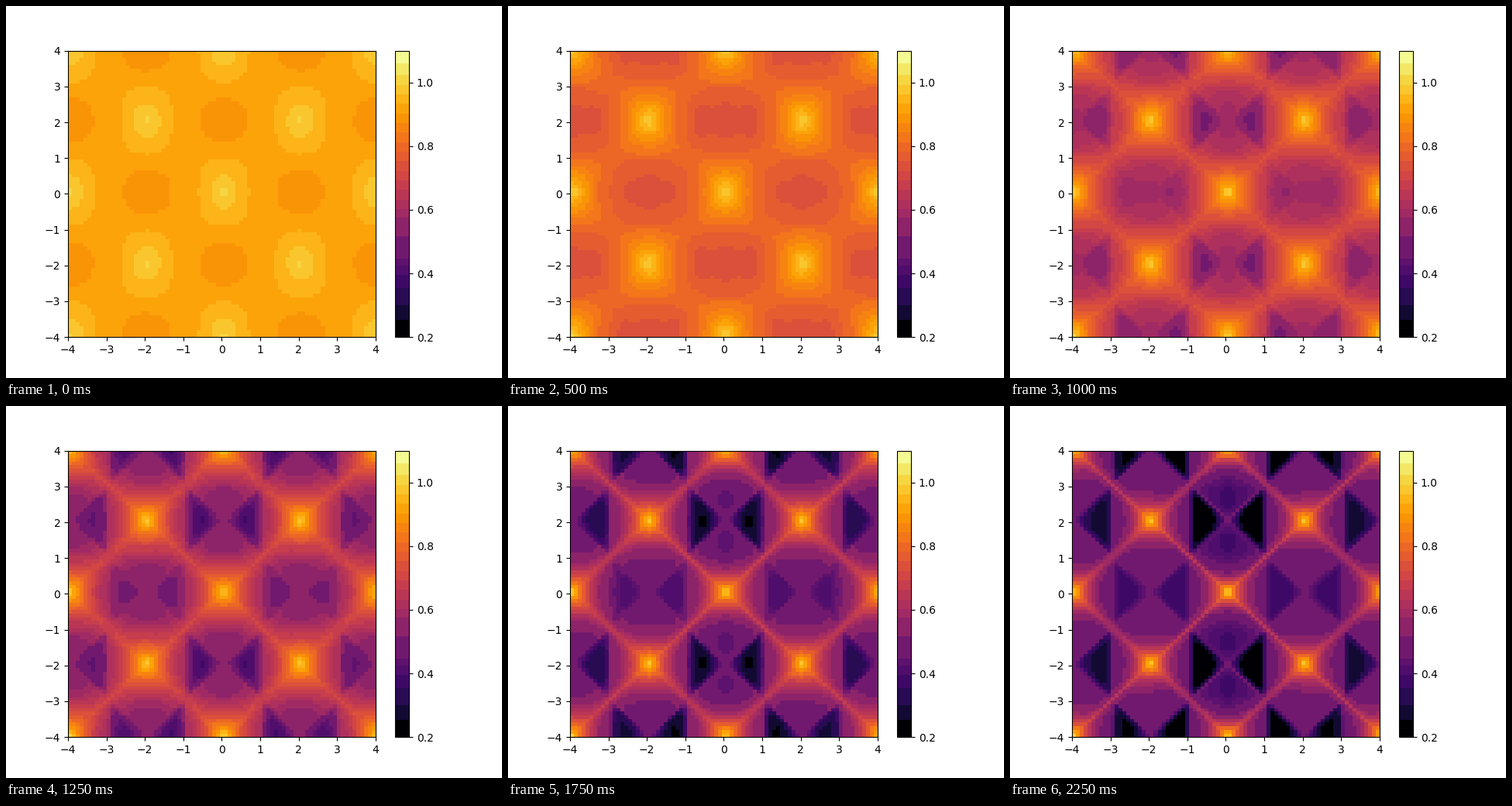
Write a matplotlib script that moves like this. It is 640x480 px and loops after 2500 ms.

```python
import numpy as np
import matplotlib.pyplot as plt
from matplotlib.animation import FuncAnimation
from matplotlib.colors import ListedColormap

FRAMES, INTERVAL = 10, 250
LOW, HIGH = 0.2, 1.1

axis = np.linspace(-4, 4, 80)
X, Y = np.meshgrid(axis, axis)
CX, CY = np.cos(np.pi * X / 2), np.cos(np.pi * Y / 2)
TILT = np.abs(CY) - np.abs(CX)


def rise(z):
    """Saturating growth from 0 to 1, zero for negative input."""
    return 1 - np.exp(-np.maximum(z, 0))


# The wells get deeper away from y = 0 and shallower away from x = 0.
well_depth = np.interp(np.abs(np.round(Y / 2)), [0, 1, 2], [0.46, 1.06, 1.16])
well_depth *= 1 - 0.1 * np.abs(X)
well_side = -CX * np.sign(CY)
peak_distance = np.sqrt(np.clip(1 - CX * CY + 0.3 * TILT, 0, 1))


def field(t):
    peaks = 0.4 * rise(0.23 * t * peak_distance)
    ridges = 0.16 * rise(1.5 * (t / 7) ** 3 * np.abs(CX - CY))
    halo = 0.025 * np.maximum(-CX * CY, 0)
    wells = 0.27 * rise((t / 5.6) ** 3) * well_depth
    wells = wells * rise(t * well_side) * rise(t * TILT)
    columns = 0.1 * rise((t / 8) ** 4) * rise(-t * TILT)
    columns = columns * np.exp(-np.abs(X))
    return 1 - peaks - ridges - halo - wells - columns


def banded_inferno(size=720):
    edges = np.concatenate([
        [0.2, 0.255, 0.30, 0.355, 0.395, 0.425, 0.447, 0.517, 0.575],
        0.602 + 0.03 * np.arange(15),
        [1.06, 1.1],
    ])
    middles = (edges[:-1] + edges[1:]) / 2
    middles[0] = LOW
    values = LOW + (np.arange(size) + 0.5) / size * (HIGH - LOW)
    band = np.clip(np.searchsorted(edges, values) - 1, 0, len(middles) - 1)
    return ListedColormap(plt.cm.inferno((middles[band] - LOW) / (HIGH - LOW)))


fig, ax = plt.subplots(figsize=(6.4, 4.8), dpi=100)
mesh = ax.pcolormesh(X, Y, field(1)[:-1, :-1], cmap=banded_inferno(),
                     vmin=LOW, vmax=HIGH, shading="flat")
fig.colorbar(mesh, ax=ax)


def update(frame):
    mesh.set_array(field(frame + 1)[:-1, :-1])
    return [mesh]


animation = FuncAnimation(fig, update, frames=FRAMES, interval=INTERVAL,
                          repeat=True, repeat_delay=0)
plt.show()
```
